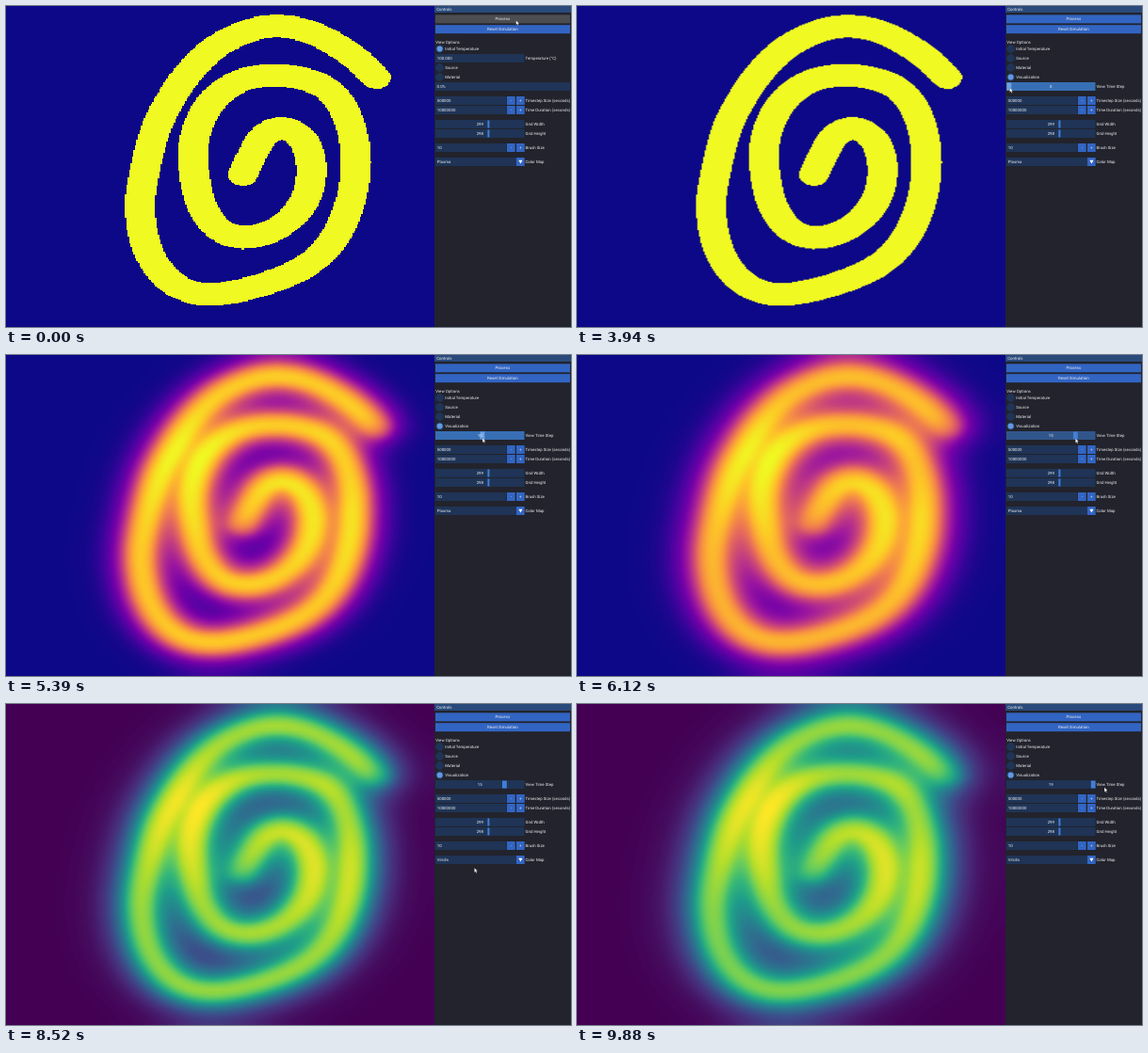
Animation of 600x341 px, one loop 10 s. Source, as an HTML page with a canvas:

```html
<!DOCTYPE html>
<html lang="en">
<head>
<meta charset="utf-8">
<title>Heat simulation</title>
<style>
  html, body { margin: 0; width: 100%; height: 100%; overflow: hidden; background: #22232c; }
  #heat { position: absolute; left: 0; top: 0; width: 455px; height: 341px; }
  #ui { position: absolute; left: 0; top: 0; }
  text { font: 4.35px Roboto, sans-serif; fill: #eceef2; text-rendering: geometricPrecision; }
  .mid { text-anchor: middle; }
</style>
</head>
<body>
<canvas id="heat" width="299" height="298"></canvas>
<svg id="ui" width="600" height="341" viewBox="0 0 600 341"></svg>
<script>
const LOOP = 10000, W = 299, H = 298, STEPS = 20, SPREAD = 0.75;
const FRAME = '#1f3456', BLUE = '#3265c3', GRAB = '#427fd4';

/* ---------- heat field ---------- */

const canvas = document.getElementById('heat');
const ctx = canvas.getContext('2d', { willReadFrequently: true });

// centre line of the painted spiral, in stage pixels
const SPIRAL = [
  393,76, 372,56, 345,38, 318,26, 290,21.5, 262,25, 230,39, 208,56, 190,76,
  173,102, 160,128, 150,164, 142.5,208, 147,248, 161,278, 183,298, 213,306.5, 250,302,
  290,290, 322,274, 347,249, 364,214, 371,175, 369,140, 358,108, 338,86, 310,76,
  280,73.5, 250,79, 226,94, 208,118, 199,148, 200,180, 208,212, 225,236, 250,246,
  280,240, 304,224, 320,200, 324.5,172, 319,148, 306,134, 290,130, 273,139,
  262,157, 251.5,179
];

function paintSpiral() {
  const pts = [];
  for (let i = 0; i < SPIRAL.length; i += 2)
    pts.push([SPIRAL[i] * W / 455, SPIRAL[i + 1] * H / 341]);
  const pt = i => pts[Math.max(0, Math.min(pts.length - 1, i))];
  ctx.lineWidth = 21;
  ctx.lineCap = ctx.lineJoin = 'round';
  ctx.beginPath();
  ctx.moveTo(...pts[0]);
  for (let i = 0; i < pts.length - 1; i++) {
    const [a, b, c, d] = [pt(i - 1), pt(i), pt(i + 1), pt(i + 2)];
    ctx.bezierCurveTo(
      b[0] + (c[0] - a[0]) / 6, b[1] + (c[1] - a[1]) / 6,
      c[0] - (d[0] - b[0]) / 6, c[1] - (d[1] - b[1]) / 6, c[0], c[1]);
  }
  ctx.stroke();
  const px = ctx.getImageData(0, 0, W, H).data;
  return Float32Array.from({ length: W * H }, (_, i) => px[i * 4 + 3] > 127 ? 1 : 0);
}

// one implicit diffusion step along a line, as a forward and a backward sweep
function sweep(f, start, stride, count) {
  const end = start + stride * (count - 1);
  for (let i = start + stride; i <= end; i += stride)
    f[i] += SPREAD * (f[i - stride] - f[i]);
  for (let i = end - stride; i >= start; i -= stride)
    f[i] += SPREAD * (f[i + stride] - f[i]);
}

// the spiral keeps giving off heat while the field spreads
const spiral = paintSpiral();
function nextField(field) {
  const f = field.map((v, i) => v + spiral[i]);
  for (let y = 0; y < H; y++) sweep(f, y * W, 1, W);
  for (let x = 0; x < W; x++) sweep(f, x, W, H);
  return f;
}

const fields = [spiral];
while (fields.length < STEPS) fields.push(nextField(fields[fields.length - 1]));

function colorMap(stops) {
  const rgb = stops.split(' ').map(h => [0, 2, 4].map(i => parseInt(h.slice(i, i + 2), 16)));
  return Array.from({ length: 256 }, (_, i) => {
    const p = i / 255 * (rgb.length - 1), k = Math.min(rgb.length - 2, Math.floor(p));
    return rgb[k].map((v, c) => v + (rgb[k + 1][c] - v) * (p - k));
  });
}
const maps = {
  Plasma: colorMap('0d0887 47039f 7301a8 9c179e bd3786 d8576b ed7953 fa9e3b fdc926 f0f921'),
  Viridis: colorMap('440154 482878 3e4989 31688e 26828e 1f9e89 35b779 6ece58 b5de2b fde725')
};

const image = ctx.createImageData(W, H);
let drawn = '';

function drawHeat(step, map, raw) {
  const key = step + map + raw;
  if (key === drawn) return;
  drawn = key;
  const f = fields[step], lut = maps[map];
  const top = f.reduce((m, v) => Math.max(m, v), 0);
  for (let i = 0; i < f.length; i++) {
    const c = lut[Math.round(f[i] / top * 255)];
    image.data.set(c, i * 4);
    image.data[i * 4 + 3] = 255;
  }
  ctx.putImageData(image, 0, 0);
  canvas.style.imageRendering = raw ? 'pixelated' : 'auto';
}

/* ---------- control panel ---------- */

const ui = document.getElementById('ui');

function add(tag, attrs, parent = ui) {
  const el = document.createElementNS('http://www.w3.org/2000/svg', tag);
  for (const k in attrs) el.setAttribute(k, attrs[k]);
  return parent.appendChild(el);
}
const rect = (x, y, width, height, fill, parent) => add('rect', { x, y, width, height, fill }, parent);
const box = (x, cy, w, fill, parent) => rect(x, cy - 4.5, w, 9, fill, parent);

function label(x, cy, s, parent, mid) {
  const el = add('text', { x, y: cy + 1.55 }, parent);
  if (mid) el.setAttribute('class', 'mid');
  el.textContent = s;
  return el;
}
function button(cy, s) {
  const el = box(456, cy, 143, BLUE);
  label(527.3, cy, s, ui, true);
  return el;
}
function radio(cy, s, on, parent) {
  add('circle', { cx: 460.6, cy, r: 4.4, fill: FRAME }, parent);
  if (on) add('circle', { cx: 460.6, cy, r: 3.1, fill: '#6298e2' }, parent);
  label(466.3, cy, s, parent);
}
function stepper(cy, value, s) {
  box(456, cy, 75.5, FRAME);
  label(457.8, cy, value);
  [['-', 532], ['+', 542]].forEach(([sign, x]) => {
    box(x, cy, 8.7, BLUE);
    label(x + 4.3, cy, sign, ui, true);
  });
  label(551.5, cy, s);
}
function slider(cy, value, s, grabX, grabW, parent) {
  const track = box(456, cy, 94.5, FRAME, parent);
  const grab = rect(grabX - grabW / 2, cy - 4, grabW, 8, GRAB, parent);
  const text = label(503.3, cy, value, parent, true);
  label(551.5, cy, s, parent);
  return { track, grab, text };
}

rect(455, 0, 145, 341, '#22232c');
rect(455, 0, 145, 7, '#294a7a');
label(457.2, 3.1, 'Controls');
const processBtn = button(13.9, 'Process');
button(24.7, 'Reset Simulation');
label(456.3, 38, 'View Options');

const setup = add('g', {});
radio(45.5, 'Initial Temperature', true, setup);
box(456, 55.5, 94.5, FRAME, setup);
label(457.8, 55.5, '100.000', setup);
label(551.5, 55.5, 'Temperature (°C)', setup);
radio(65.5, 'Source', false, setup);
radio(75.5, 'Material', false, setup);
box(456, 85.5, 143, FRAME, setup);
const bar = box(456, 85.5, 0, '#e0b02c', setup);
const percent = label(457.6, 85.5, '0.0%', setup);

const result = add('g', {});
radio(45.5, 'Initial Temperature', false, result);
radio(55.5, 'Source', false, result);
radio(65.5, 'Material', false, result);
radio(75.5, 'Visualization', true, result);
const timeStep = slider(85.5, '0', 'View Time Step', 458.9, 4.8, result);

stepper(100.5, '500000', 'Timestep Size (seconds)');
stepper(110.5, '10000000', 'Time Duration (seconds)');
slider(125.5, '299', 'Grid Width', 512.4, 2);
slider(135.5, '298', 'Grid Height', 512.4, 2);
stepper(150.5, '10', 'Brush Size');

box(456, 165.5, 86, FRAME);
box(542, 165.5, 8.7, BLUE);
add('path', { d: 'M544.3 163.8h4.2l-2.1 3.6z', fill: '#fff' });
const mapName = label(457.8, 165.5, 'Plasma');
label(551.5, 165.5, 'Color Map');

const popup = add('g', {});
rect(456.5, 170.5, 93.8, 13, '#17181f', popup);
const rowA = rect(457.5, 171.4, 92, 5.8, '#4a82cc', popup);
rect(457.5, 177.4, 92, 5.4, '#22406e', popup);
label(458.5, 174.4, 'Viridis', popup);
label(458.5, 180.2, 'Plasma', popup);

const cursor = add('path', {
  d: 'M0 0V4.9L1.2 3.9 2 5.6 2.8 5.2 2 3.5H3.5Z',
  fill: '#fff', stroke: '#111', 'stroke-width': 0.25
});

/* ---------- timeline ---------- */

const RUN_END = 3270, MENU = 7000, HOVER = 7450, PICK = 7640;
const DRAG1 = [3940, 6120], DRAG2 = [8720, 9550];

// time, x, y of the pointer tip
const POINTER = [
  [0, 541.6, 15.2], [RUN_END, 541.6, 15.2], [3580, 459.5, 86.5], [3940, 459.5, 86.8],
  [6120, 529.3, 88.6], [6640, 529.3, 88.6], [6760, 555, 125], [6900, 545.5, 163.5],
  [HOVER, 545.5, 163.5], [HOVER, 497.2, 174.5], [8520, 497.2, 174.5],
  [8720, 530, 87.5], [9120, 542.6, 88.5], [9350, 548.4, 88.5], [9550, 548.4, 88.5],
  [9880, 560, 88.6], [LOOP, 560, 88.6]
];

function pointerAt(t) {
  const i = POINTER.findIndex(p => p[0] > t);
  const [a, b] = [POINTER[i - 1], POINTER[i]];
  const u = (t - a[0]) / (b[0] - a[0]);
  return [a[1] + (b[1] - a[1]) * u, a[2] + (b[2] - a[2]) * u];
}

function stepAt(t) {
  if (t < DRAG1[0]) return 0;
  if (t >= DRAG1[1] && t < DRAG2[0]) return 15;
  const x = pointerAt(Math.min(t, DRAG2[1]))[0];
  return Math.max(0, Math.min(STEPS - 1, Math.round((x - 458.9) / 4.7)));
}

const within = (t, [a, b]) => t >= a && t < b;
const show = (el, on) => el.setAttribute('visibility', on ? 'visible' : 'hidden');

function render(t) {
  const running = t < RUN_END, step = stepAt(t);
  const map = t < PICK ? 'Plasma' : 'Viridis';
  const [x, y] = pointerAt(t);

  drawHeat(running ? 0 : step, map, running);
  show(setup, running);
  show(result, !running);
  processBtn.setAttribute('fill', running ? '#4c4d50' : BLUE);

  const done = [360, 440, 520, 610].filter(at => t >= at).length * 5;
  bar.setAttribute('width', 1.43 * done);
  percent.setAttribute('x', 457.6 + 1.43 * done);
  percent.textContent = done.toFixed(1) + '%';

  const active = within(t, DRAG1) || within(t, DRAG2);
  const over = x >= 456 && x <= 550.5 && y >= 81 && y <= 90;
  timeStep.track.setAttribute('fill', active ? '#386fb4' : over ? '#31568c' : FRAME);
  timeStep.grab.setAttribute('fill', active ? '#6da2e4' : GRAB);
  timeStep.grab.setAttribute('x', 456.5 + 4.7 * step);
  timeStep.text.textContent = step;

  mapName.textContent = map;
  show(popup, t >= MENU && t < PICK);
  rowA.setAttribute('fill', t >= HOVER ? '#4a82cc' : '#17181f');
  cursor.setAttribute('transform', `translate(${x} ${y})`);
}

const begin = performance.now();
function tick() {
  render((performance.now() - begin) % LOOP);
  requestAnimationFrame(tick);
}
tick();
</script>
</body>
</html>
```
